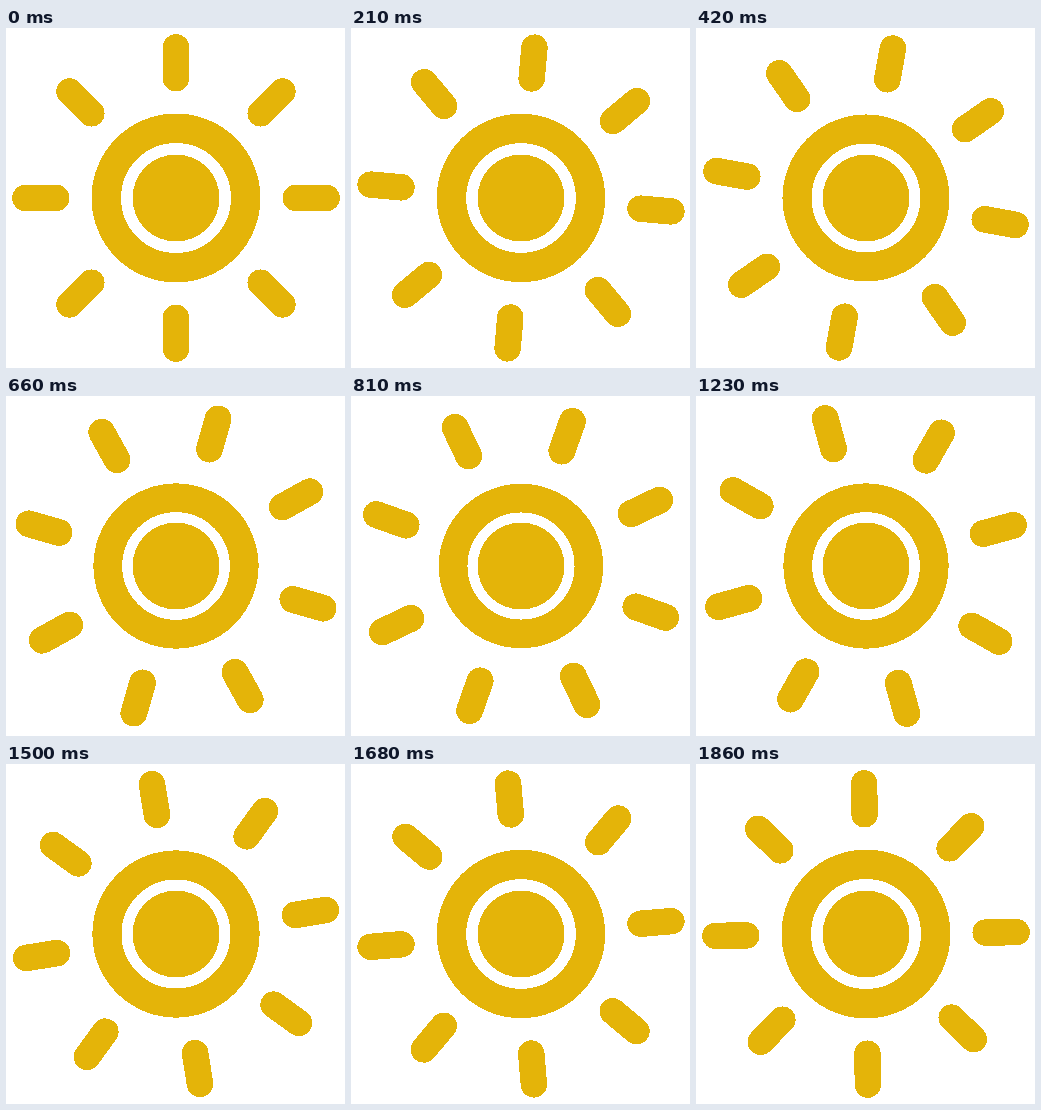
An HTML page that plays this animation: 339 px wide and 340 px high, repeating every 1890 ms.

```html
<!DOCTYPE html>
<html>
<head>
<meta charset="utf-8">
<title>Sun</title>
<style>
  html, body { margin: 0; width: 100%; height: 100%; overflow: hidden; background: #fff; }
  svg { display: block; width: 339px; height: 340px; }
</style>
</head>
<body>
<svg viewBox="0 0 339 340" shape-rendering="crispEdges">
  <g transform="translate(170 170)" fill="none" stroke="#e4b409">
    <circle r="43.5" fill="#e4b409" stroke="none"/>
    <circle id="ring" r="69.75" stroke-width="29.5"/>
    <g id="rays" stroke-width="26.4" stroke-linecap="round"></g>
  </g>
</svg>
<script>
  const LOOP = 1890, STEP = 30;
  const ring = document.getElementById('ring');
  const rays = document.getElementById('rays');

  for (let i = 0; i < 8; i++) {
    rays.innerHTML += `<path d="M0-119.7V-150.6" transform="rotate(${i * 45})"/>`;
  }

  function draw(now) {
    const p = Math.floor(now % LOOP / STEP) * STEP / LOOP;
    const pulse = (1 - Math.cos(2 * Math.PI * p)) / 2;
    const angle = 45 * p + 0.3 * Math.sin(Math.PI * p);
    // The ring shrinks a little while the rays reach outwards.
    ring.setAttribute('transform', `scale(${1 - 0.028 * pulse})`);
    rays.setAttribute('transform', `rotate(${angle}) scale(${1 + 0.02 * pulse})`);
  }

  const start = performance.now();
  function tick() {
    draw(performance.now() - start);
    requestAnimationFrame(tick);
  }
  tick();
</script>
</body>
</html>
```
